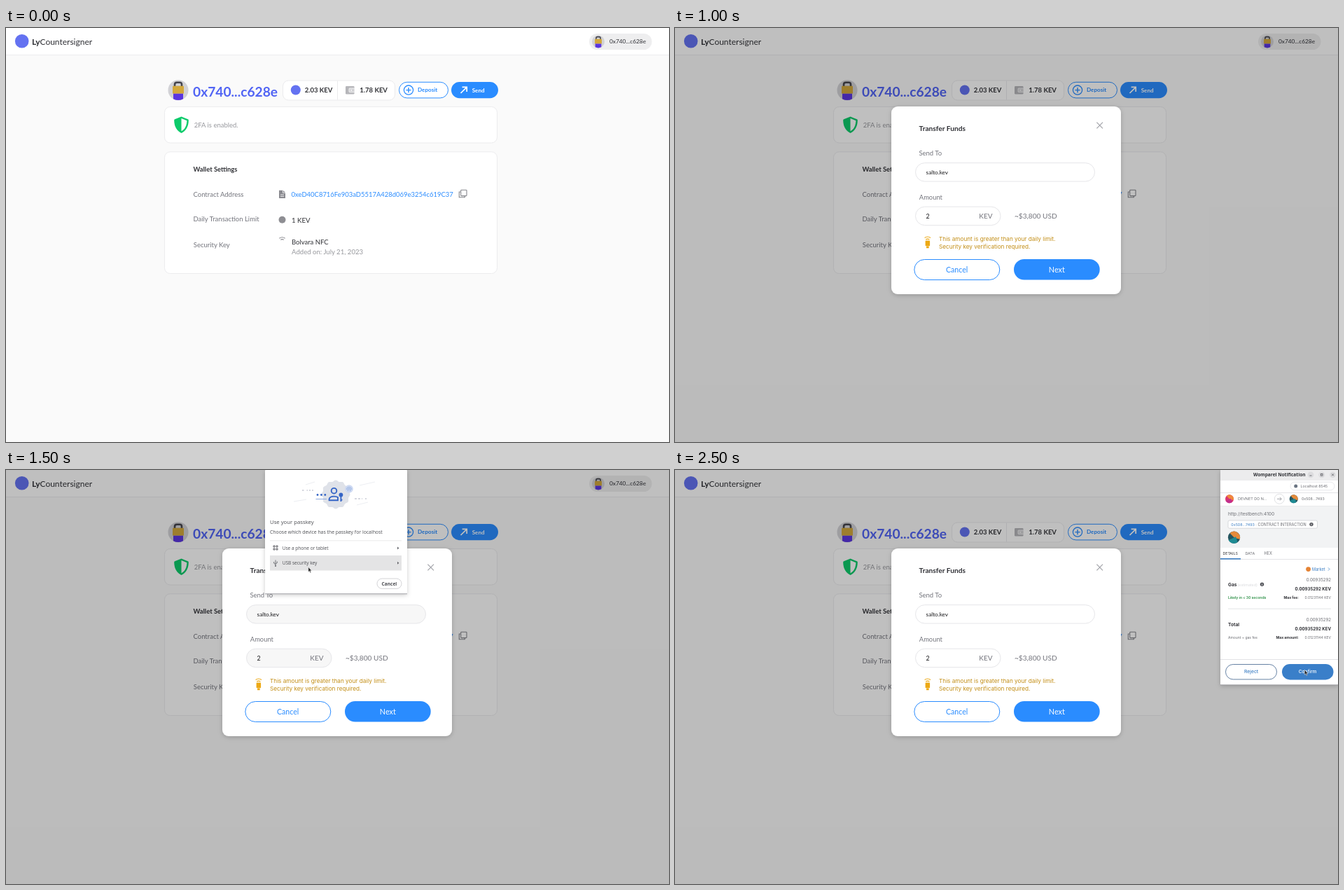
Write an HTML page that moves like this. It is 947 by 591 pixels and loops after 3000 ms.

```html
<!DOCTYPE html>
<html lang="en">
<head>
<meta charset="utf-8">
<title>Wallet transfer</title>
<style>
html, body { margin: 0; width: 100%; height: 100%; overflow: hidden; background: #fafafa; }
svg { display: block; width: 100vw; height: 100vh; }
text { white-space: pre; }
</style>
</head>
<body>
<svg id="stage" viewBox="0 0 947 591" xmlns="http://www.w3.org/2000/svg"></svg>
<script>
const STEP = 500, LOOP = 3000;
const BLUE = '#2a8cff', INK = '#303136', GREY = '#73747c', SOFT = '#97989d';
const LATO = 'Lato, sans-serif', INTER = 'Inter, sans-serif', OPEN = "'Open Sans', sans-serif";
const ACCOUNT = '0x740...c628e', PEER = '0x508...7493';

const attrs = o => Object.entries(o).map(([k, v]) => ` ${k}="${v}"`).join('');
const rect = (x, y, w, h, r, fill, stroke = 'none', sw = 1) =>
  `<rect${attrs({ x, y, width: w, height: h, rx: r, fill, stroke, 'stroke-width': sw })}/>`;
const circle = (cx, cy, r, fill, stroke = 'none', sw = 1) =>
  `<circle${attrs({ cx, cy, r, fill, stroke, 'stroke-width': sw })}/>`;
const path = (d, stroke, sw = 1, fill = 'none') =>
  `<path${attrs({ d, stroke, fill, 'stroke-width': sw })}/>`;
const shape = (d, fill) => path(d, 'none', 0, fill);
// y is the middle of the capital letters
const label = (font, x, y, size, fill, str, weight = 400, anchor = 'start') =>
  `<text${attrs({ x, y: y + size * .36, 'font-family': font, 'font-size': size,
    'font-weight': weight, fill, 'text-anchor': anchor })}>${str}</text>`;
const lato = (...a) => label(LATO, ...a);
const inter = (...a) => label(INTER, ...a);
const open = (...a) => label(OPEN, ...a);
const group = (id, ...parts) => `<g id="${id}">${parts.join('')}</g>`;
const at = (x, y, k, body) => `<g transform="translate(${x} ${y}) scale(${k})">${body}</g>`;

const avatar = (x, y, k) => at(x, y, k,
  circle(0, 0, 14.5, '#d2d2d6') +
  path('M-5 -5V-8Q-5 -11 -2 -11H2Q5 -11 5 -8V-5', '#44444c', 2.6) +
  rect(-8, -6, 16, 11, 1, '#d3a83c') +
  shape('M-7 5H7V12.5Q0 16.2 -7 12.5Z', '#5a35e0'));

const shield = (x, y) => at(x, y, 1,
  shape('M0 -11.5L9.4 -7.8Q10.3 -7.4 10.3 -6.3C10.3 3 6 9.2 0 12C-6 9.2 -10.3 3 -10.3 -6.3Q-10.3 -7.4 -9.4 -7.8Z', '#0dcb6b') +
  shape('M0 -8.9L7.9 -5.7C7.7 2 4.6 6.7 0 9.2Z', '#fff'));

const pointer = (x, y) => at(x, y, 1,
  path('M0 0V7L1.6 5.6L2.7 8.2L3.9 7.7L2.8 5.2H4.9Z', '#fff', .5, '#222'));

const cross = (x, y) =>
  path(`M${x - 4.3} ${y - 4.3}l8.6 8.6m0 -8.6l-8.6 8.6`, '#a3a4aa', 1.2);

const base = group('base',
  rect(0, 0, 947, 591, 0, '#fafafa'),
  rect(0, 0, 947, 38, 0, '#fff'),
  rect(0, 38, 947, 1, 0, '#ececee'),
  circle(22.7, 18.7, 9.8, '#6472f1'),
  lato(37, 19.3, 12, INK, '<tspan font-weight="700">Ly</tspan>Countersigner'),
  rect(833, 8, 89.5, 23, 11.5, '#eeeeef'),
  avatar(846, 19.5, .62),
  lato(862, 19.5, 8.3, INK, ACCOUNT),

  avatar(246, 88.7, 1),
  lato(267, 90.8, 19.2, '#5164f4', ACCOUNT, 700),
  rect(395.5, 75, 160, 28, 8, '#fff', '#ebebed'),
  rect(473, 75.5, 1, 27, 0, '#ebebed'),
  circle(413.8, 88.5, 7, '#6472f1'),
  lato(426.7, 89, 9.5, INK, '2.03 KEV', 700),
  rect(485, 83, 12.5, 11.5, 1.2, '#b6b6ba'),
  rect(490, 86, 8, 5.6, .8, '#d2d2d5', '#fff', .8),
  circle(493.3, 88.8, .9, '#fff'),
  lato(505.3, 89, 9.5, INK, '1.78 KEV', 700),
  rect(561.5, 77.3, 70, 22.6, 11.3, '#fff', BLUE),
  circle(575, 88.6, 6.6, 'none', BLUE, 1.3),
  path('M571.4 88.6h7.2M575 85v7.2', BLUE, 1.4),
  lato(588, 88.4, 8.1, BLUE, 'Deposit', 700),
  rect(636, 77, 67, 23.2, 11.6, BLUE),
  path('M649.5 93L658 84.6M651.6 84.4H658.2V91', '#fff', 1.7),
  lato(665.7, 88.7, 8.1, '#fff', 'Send', 700),

  rect(226.5, 112.5, 475, 51.5, 8, '#fff', '#ececee'),
  shield(250.5, 138),
  lato(268.7, 139, 9.5, SOFT, '2FA is enabled.'),

  rect(226.5, 176.8, 475, 173.7, 8, '#fff', '#ececee'),
  lato(267.5, 202, 9.4, INK, 'Wallet Settings', 700),
  lato(267.5, 237.2, 9.5, GREY, 'Contract Address'),
  shape('M390 231.7H395.8L399 235V243H390Z', '#8a8a90'),
  path('M395.5 231.7V235.3H399M392 238H397M392 240.4H397', '#fff', .8),
  lato(407.6, 237.7, 9.46, BLUE, '0xeD40C8716Fe903aD5517A428d069e3254c619C37'),
  path('M649.5 234H647.3V241.8H655.3V239.8', '#85868c', 1.1),
  rect(649.7, 231.3, 8.3, 8.3, .8, 'none', '#85868c', 1.1),
  lato(267.5, 272.8, 9.5, GREY, 'Daily Transaction Limit'),
  circle(394.5, 273.7, 5, '#8e8e93'),
  lato(408, 274.3, 9.6, INK, '1 KEV'),
  lato(267.8, 309.2, 9.5, GREY, 'Security Key'),
  path('M390.4 300.2Q394.5 297.4 398.6 300.2M392.2 302.4Q394.5 300.9 396.8 302.4', '#8a8a90', 1.1),
  lato(408, 305.8, 9.5, INK, 'Bolvara NFC'),
  lato(408, 319.5, 9.6, SOFT, 'Added on: July 21, 2023'));

const dim = group('dim', rect(0, 0, 947, 591, 0, 'rgba(0,0,0,.25)'));

// Shared card of the transfer form; dy shifts its upper rows
const card = (dy, h, unitX, unitEnd, usd, usdX) =>
  `<g filter="url(#soft)">${rect(309, 112 + dy, 328, h, 9, '#fff')}</g>` +
  lato(348.6, 143.6 + dy, 10.2, INK, 'Transfer Funds', 700) + cross(606.7, 139 + dy) +
  lato(348.4, 178.6 + dy, 9.5, GREY, 'Send To') +
  `<g class="field">${rect(343.5, 192.6 + dy, 256, 26.4, 13.2, '#fff', '#e6e6e9')}` +
  `${rect(343.5, 255.2 + dy, unitEnd - 343.5, 26.4, 13.2, '#fff', '#e6e6e9')}</g>` +
  lato(348.8, 241.4 + dy, 9.4, GREY, 'Amount') +
  lato(unitX, 268.6 + dy, 10, GREY, 'KEV') +
  lato(usdX, 268.6 + dy, 10.1, GREY, usd);

const buttons = (y, word, fill) =>
  rect(341.8, y + .5, 122, 29, 14.5, '#fff', BLUE) +
  lato(402.6, y + 15, 10.6, BLUE, 'Cancel', 400, 'middle') +
  rect(484, y, 122.7, 29.6, 14.8, fill) +
  lato(545.3, y + 15, 10.8, '#fff', word, 400, 'middle');

const empty = group('empty',
  card(.7, 249, 436, 466, '~$0.00 USD', 488),
  lato(358.7, 207, 8.3, SOFT, 'Enter an Kevadium address or KNS'.replace('an ', 'a ')),
  lato(358.7, 269.6, 8.3, SOFT, 'Enter an amount'),
  buttons(307.2, 'Send', '#94c5ff'));

const GOLD = '#eda915', WARN = '#c28d14';
const filled = group('filled',
  card(0, 268, 434.3, 465, '~$3,800 USD', 485),
  lato(358.6, 206.2, 8.2, '#17171a', 'salto.kev'),
  lato(358.6, 268.8, 8.8, '#17171a', '2'),
  path('M356.6 299.6Q360.8 296.4 365 299.6M358.2 302Q360.8 300.2 363.4 302', GOLD, 1.2),
  rect(357.6, 303.6, 6.5, 7.6, .8, GOLD), rect(359, 311.6, 3.7, 2.6, .3, GOLD),
  inter(377, 301.4, 8.2, WARN, 'This amount is greater than your daily limit.'),
  inter(377, 311.6, 8.2, WARN, 'Security key verification required.'),
  buttons(330, 'Next', BLUE));

const sheet = (x, y, w, h) => `<g filter="url(#soft)">${rect(x, y, w, h, 1, '#fff')}</g>` +
  rect(x, y + h - .6, w, .8, 0, '#8b8b92');

const specks = x =>
  path(`M${x} 29h2.5m4 0h1.5m2 0h2m2 0h2M${x + 75} 41h3m2 0h3m2 0h1m4 0h2`, '#c9ccd6', 1.5) +
  path(`M${x + 5} 21l13 -4M${x - 12} 45l18 -3M${x + 82} 22l22 -5M${x + 78} 50l16 -4`, '#eceef2', 1);

let scallop = 'M';
for (let i = 0; i <= 96; i++) {
  const a = i / 96 * Math.PI * 2, r = 19.6 + .9 * Math.cos(a * 12);
  scallop += `${(471 + r * Math.cos(a)).toFixed(1)} ${(35 + r * Math.sin(a)).toFixed(1)} `;
}

const NAVY = '#3565c6', TEXT = '#4c4d52';
const passkey = group('passkey',
  sheet(370, 0, 203, 177),
  specks(423),
  shape(scallop + 'Z', '#dfe2e9'),
  circle(490, 27, 5.8, '#cdd9f2'),
  path('M486.5 28a3.5 3.5 0 0 1 7 0M488.5 30v-2a1.5 1.5 0 0 1 3 0v2', '#8fabdf', .8),
  circle(468.5, 29.7, 3.8, 'none', NAVY, 1.9),
  path('M461.6 43.3V41.5Q462.5 37.6 468.5 37.6Q472 37.6 474 39V43.3Z', NAVY, 1.9),
  circle(478.4, 35.5, 2.9, NAVY), path('M478.4 37V45M478.4 42.7h2', NAVY, 1.8),
  circle(445, 35.5, 1.4, NAVY), circle(450.4, 35.5, 1.4, NAVY), circle(455.8, 35.5, 1.4, NAVY),
  path('M442.5 41.5H458', '#8fabdf', 1),
  open(377, 74, 7.75, TEXT, 'Use your passkey'),
  open(377, 88.4, 6.88, TEXT, 'Choose which device has the passkey for localhost'),
  rect(377, 100.5, 188, .8, 0, '#e3e3e5'),
  path('M383 107v8M387 107v8M381 109h8M381 113h8', '#66676c', 1),
  open(394.7, 111.4, 6.55, TEXT, 'Use a phone or tablet'),
  rect(377, 122, 188, 21.5, 0, '#e4e4e5'),
  path('M385 128.5v8.6M382.7 131v2.2l2.3 1.6M387.3 130.5v2l-2.3 1.5', '#66676c', .9),
  circle(385, 137, 1, '#66676c'),
  open(394.7, 132.8, 6.5, TEXT, 'USB security key'),
  shape('M559 109.4l2.4 2l-2.4 2ZM559 130.8l2.4 2l-2.4 2Z', '#66676c'),
  pointer(431.8, 138.6),
  rect(530, 155, 35, 14.4, 7.2, '#fff', '#cfcfd2', .9),
  open(547.4, 162.2, 6.6, TEXT, 'Cancel', 700, 'middle'));

const touch = group('touch',
  sheet(371, 0, 203, 126.4),
  path('M371 .5H388M474 .5H574', '#6f8fc6', 1),
  specks(424),
  path('M464 42V25Q464 17.3 472.4 17.3Q480.8 17.3 480.8 25V42Z', '#5d7fc0', 1.5, '#dfe3ec'),
  circle(472.4, 26, 2.8, '#fff', '#5d7fc0', 1),
  rect(468, 42.4, 8.8, 7, .5, '#c4d1ea', '#5d7fc0', 1),
  path('M471 45v2M474 45v2', '#5d7fc0', 1),
  open(378, 73, 7.9, TEXT, 'Use your security key with localhost'),
  open(378, 87.8, 6.9, TEXT, 'Insert your security key and touch it'),
  rect(378, 104, 84.5, 14.6, 7.3, '#fff', '#b3a093', 1),
  open(420.2, 111.3, 6.4, TEXT, 'Use a different device', 700, 'middle'),
  rect(531, 104, 35.5, 14.6, 7.3, '#fff', '#d6d6d9', .9),
  open(548.7, 111.3, 6.5, TEXT, 'Cancel', 700, 'middle'));

// Two-tone account disc
const disc = (x, y, r, a, b, c) => at(x, y, r,
  circle(0, 0, 1, a) + shape('M-.7 -.7A1 1 0 0 1 .95 .3L.1 .1Z', b) + shape('M-.9 .45L.3 -.1L.6 .8A1 1 0 0 1 -.9 .45Z', c));
const peer = (x, y, r) => disc(x, y, r, '#24545f', '#e58a3a', '#1f8b93');
const rule = (y, x = 779, w = 168) => rect(x, y, w, .8, 0, '#dcdde0');
const info = (x, y) => circle(x, y, 2.7, '#55565c') + rect(x - .4, y - .5, .8, 2, 0, '#fff') + circle(x, y - 1.4, .45, '#fff');
const LINK = '#3d7fc4', MID = '#6b6c72';
const feeRows = (y, name, note, noteFill, noteWeight, cap) =>
  inter(937, y, 6.1, MID, '0.00935292', 400, 'end') +
  inter(937, y + 13.3, 6.1, INK, '0.00935292 KEV', 700, 'end') +
  inter(790, y + 6.7, 6.6, INK, name, 700) +
  inter(790, y + 25.6, 5, noteFill, note, noteWeight) +
  inter(891, y + 25.6, 5.1, INK, cap, 700, 'end') +
  inter(937, y + 25.6, 5, MID, '0.01231144 KEV', 400, 'end');

const notice = group('notice',
  sheet(779, 0, 168, 307),
  rect(779, 0, 168, 15, 0, '#ececed'),
  open(900.5, 7, 6.55, INK, 'Womparel Notification', 700, 'end'),
  [908, 923.7, 939.5].map(x => circle(x, 6.8, 4.4, '#dcdcde')).join(''),
  path('M906.5 8h3M938 5.3l3 3m0 -3l-3 3', '#55565c', .8),
  rect(922.4, 5.5, 2.6, 2.6, 0, 'none', '#55565c', .8),
  rect(879, 17.2, 63, 11.6, 5.8, '#fff', '#e2e3e6', .8),
  circle(886.7, 23, 2.5, '#6a7482'),
  inter(893.4, 23, 5.3, MID, 'Localhost 8545'),
  rule(32),
  disc(792, 41.3, 6, '#d9356f', '#f08a3c', '#c22f8d'),
  inter(804, 41.2, 5.4, MID, 'DEVNET DO N...'),
  rule(51), rect(779, 51.5, 168, 59.5, 0, '#f2f3f4'),
  circle(863.3, 41.3, 7, '#fff', '#dcdde0', .9),
  path('M860 41.3h6.2m-2.4 -2.4l2.4 2.4l-2.4 2.4', '#9a9ba1', .9),
  peer(883.7, 41.3, 6),
  inter(895, 41.2, 5.25, MID, PEER),
  inter(790, 63, 6.5, MID, 'http://testbench:4100'),
  rect(790, 72, 127.5, 11.2, 2, '#fff', '#cfd1d5', .8),
  inter(794.3, 77.6, 5.4, LINK, PEER),
  inter(829.3, 77.6, 5.5, MID, ': CONTRACT INTERACTION'),
  info(909, 77.6),
  peer(798.5, 96.2, 8.6),
  inter(782.4, 119.4, 5.3, INK, 'DETAILS'),
  inter(814.4, 119.4, 5.4, MID, 'DATA'),
  inter(841.4, 119.4, 5.6, MID, 'HEX'),
  rule(127), rect(779, 126, 29, 1.6, 0, LINK),
  circle(904.6, 141.6, 3.4, '#e58334'),
  inter(910, 141.5, 5.7, LINK, 'Market'),
  path('M933 139.5l2 2l-2 2', LINK, .8),
  feeRows(156.8, 'Gas', 'Likely in &lt; 30 seconds', '#3f9a57', 700, 'Max fee:'),
  inter(803.5, 163.7, 5.3, '#dadbde', '(estimated)'),
  info(838.5, 163.3),
  rule(197.7, 790, 147),
  feeRows(213.6, 'Total', 'Amount + gas fee', MID, 400, 'Max amount:'),
  rule(270),
  rect(786.5, 277.5, 73, 21.4, 10.7, '#fff', '#55749a', .9),
  inter(823, 288, 6.8, LINK, 'Reject', 500, 'middle'),
  rect(867, 277, 73.5, 22.4, 11.2, '#3a7fc9'),
  inter(903.6, 288, 6.7, '#fff', 'Confirm', 500, 'middle'),
  pointer(899.2, 285.2));

const stage = document.getElementById('stage');
stage.innerHTML =
  `<defs><filter id="soft" x="-10%" y="-10%" width="120%" height="120%">
  <feDropShadow dx="0" dy="1.5" stdDeviation="3" flood-opacity=".2"/></filter></defs>` +
  base + dim + empty + filled + passkey + touch + notice;

const scenes = [
  ['base'],
  ['base', 'dim', 'empty'],
  ['base', 'dim', 'filled'],
  ['base', 'dim', 'filled', 'passkey'],
  ['base', 'dim', 'filled', 'touch'],
  ['base', 'dim', 'filled', 'notice']
];
const layers = [...stage.children].filter(n => n.id);
const fields = stage.querySelectorAll('#filled .field rect');
let shown = -1;

function draw(time) {
  const n = Math.floor((time % LOOP) / STEP);
  if (n === shown) return;
  shown = n;
  layers.forEach(g => g.setAttribute('display', scenes[n].includes(g.id) ? 'inline' : 'none'));
  fields.forEach(f => f.setAttribute('fill', n === 3 ? '#f7f7f7' : '#fff'));
}

const start = performance.now();
function tick() {
  draw(performance.now() - start);
  requestAnimationFrame(tick);
}
tick();
</script>
</body>
</html>
```
